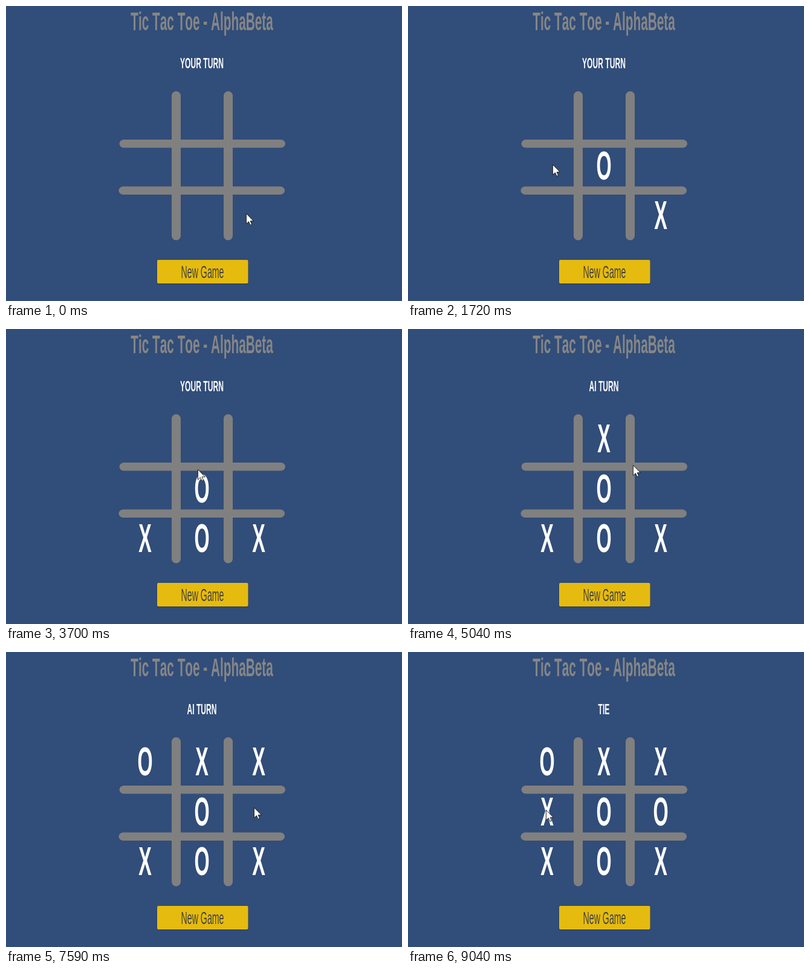
Animation of 655x488 px, one loop 9110 ms. Source, as an HTML page:

```html
<!DOCTYPE html>
<html lang="en">
<head>
<meta charset="utf-8">
<title>Tic Tac Toe</title>
<style>
html, body { margin: 0; width: 100%; height: 100%; overflow: hidden; background: #314d79; }
svg { display: block; }
text {
  font-family: "Liberation Sans", Arial, sans-serif; font-weight: bold;
  font-kerning: none; text-anchor: middle; fill: #fff;
}
</style>
</head>
<body>
<svg width="655" height="488" viewBox="0 0 655 488">
  <g id="labels"></g>
  <g fill="#808080">
    <rect x="274" y="141" width="15" height="246.5" rx="7.5"/>
    <rect x="360" y="141" width="15" height="246.5" rx="7.5"/>
    <rect x="187.5" y="221" width="274.5" height="13.5" rx="7.5"/>
    <rect x="186.5" y="298.5" width="274.5" height="13.5" rx="7.5"/>
  </g>
  <rect x="249.5" y="420" width="151.5" height="40" rx="2" fill="#2c3a4c"/>
  <rect x="250" y="420" width="150.5" height="39" rx="2" fill="#e6bb0f"/>
  <g id="front"></g>
  <path id="cursor" d="M.4.4V17.3L4.4 13.6 7 19.4 9.6 18.3 7.1 12.7H12.4Z" fill="#fff" stroke="#111" stroke-width=".9"/>
</svg>
<script>
const LOOP = 9110, STEP = 69, AI_DELAY = 1000, SQUEEZE = 0.49;
const $ = id => document.getElementById(id);

// All lettering shares one horizontal squeeze.
function label(parent, text, x, y, size, style = "") {
  const el = document.createElementNS("http://www.w3.org/2000/svg", "text");
  el.setAttribute("transform", `translate(${x} ${y}) scale(${SQUEEZE} 1)`);
  el.setAttribute("font-size", size);
  el.setAttribute("style", style);
  el.textContent = text;
  return $(parent).appendChild(el);
}

label("labels", "Tic Tac Toe - AlphaBeta", 324, 40, 42.4, "fill:#868686");
label("front", "New Game", 325, 449.5, 29, "fill:#46443a;font-weight:normal");
const status = label("labels", "", 324, 103, 24.7);

// Cells are numbered row by row; X clicks, O answers after a fixed delay.
const cells = [8, 4, 6, 7, 1, 0, 2, 5, 3];
const clicks = [30, 2345, 4540, 6970, 9035];
const moves = cells.map((cell, i) => ({
  start: clicks[i >> 1] + i % 2 * AI_DELAY,
  mark: label("labels", "XO"[i % 2], 230 + 94 * (cell % 3), 204 + 82.5 * Math.floor(cell / 3), 66)
}));

// Cursor glides: start, duration, end x, end y
const glides = [
  [483, 207, 380, 333], [828, 207, 336, 314], [1035, 485, 257, 235],
  [1520, 560, 209, 308], [2080, 260, 221, 338], [2480, 280, 278, 261],
  [2760, 270, 356, 226], [3450, 205, 317, 232], [3655, 795, 325, 187],
  [4690, 347, 372, 225], [5037, 623, 393, 250], [6070, 205, 396, 256],
  [6480, 280, 411, 200], [6960, 630, 410, 257], [7720, 760, 203, 257],
  [8620, 340, 228, 261]
];

function cursorAt(t) {
  let x = 397, y = 343;
  for (const [start, duration, endX, endY] of glides) {
    const k = Math.min(1, Math.max(0, (t - start) / duration));
    x += (endX - x) * k;
    y += (endY - y) * k;
  }
  return [Math.round(x), Math.round(y)];
}

function draw(now) {
  const t = now % LOOP;
  const played = moves.filter(move => t >= move.start).length;
  moves.forEach(({ mark }, i) => mark.style.display = i < played ? "" : "none");
  status.textContent = played === 9 ? "TIE" : played % 2 ? "AI TURN" : "YOUR TURN";
  const tick = Math.floor((t + 5) / STEP) * STEP;
  $("cursor").setAttribute("transform", `translate(${cursorAt(tick)})`);
}

const begin = performance.now();
(function frame() {
  draw(performance.now() - begin);
  requestAnimationFrame(frame);
})();
</script>
</body>
</html>
```
